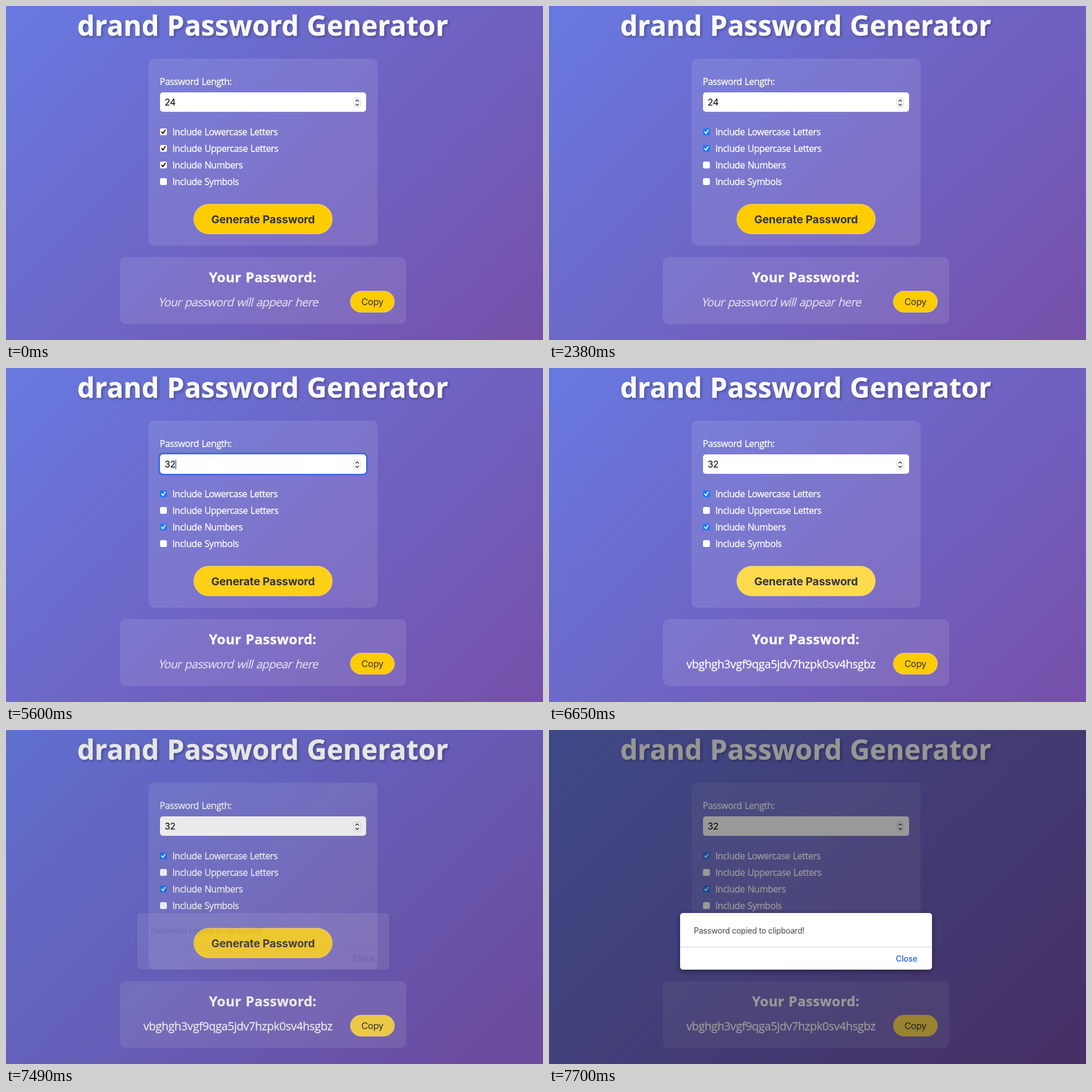
These frames come from a looping animation (938x584 px, 8000 ms). An HTML page:

```html
<!DOCTYPE html>
<html lang="en">
<head>
<meta charset="utf-8">
<title>Password generator</title>
<style>
  html, body { margin: 0; width: 100%; height: 100%; overflow: hidden; }
  svg { display: block; width: 100vw; height: 100vh; background: linear-gradient(135deg, #6779e0, #7550a9); }
  text { white-space: pre; }
  .page { font-family: "Open Sans", "Noto Sans", sans-serif; fill: #fff; stroke: #fff; stroke-width: .3px; }
  .body { font-size: 16px; letter-spacing: -.028em; word-spacing: .07em; }
  .title { font-size: 48px; font-weight: 700; letter-spacing: .2px; word-spacing: 1px; stroke-width: .5px; text-shadow: 2px 2px 4px rgba(0, 0, 0, .3); }
  .heading { font-size: 24px; font-weight: 700; letter-spacing: .3px; word-spacing: 1px; }
  .result { font-size: 20px; letter-spacing: -.023em; }
  .hint { font-size: 20px; letter-spacing: -.033em; word-spacing: .07em; opacity: .74; }
  .ui { font-family: Inter, Roboto, sans-serif; font-size: 16px; letter-spacing: -.3px; fill: #333; }
  .generate { font-size: 19.2px; font-weight: 700; letter-spacing: -.1px; }
  .message { font-size: 14px; letter-spacing: -.25px; fill: #45454f; }
  .close { font-size: 14px; font-weight: 500; letter-spacing: -.1px; fill: #2059dc; }
  .mid { text-anchor: middle; }
  .card { fill: #fff; fill-opacity: .1; }
  .line { fill: none; stroke-linecap: round; stroke-linejoin: round; }
  .button { stroke: #ebd796; stroke-opacity: .8; }
  .box { filter: drop-shadow(0 .5px .5px rgba(0, 0, 0, .25)); }
  #dialog .panel { filter: drop-shadow(0 3px 5px rgba(0, 0, 0, .4)); }
</style>
</head>
<body>
<svg viewBox="0 0 938 584" preserveAspectRatio="none">
  <text class="page title mid" x="448.5" y="52">drand Password Generator</text>

  <rect class="card" x="249" y="92" width="400" height="327" rx="10"/>
  <text class="page body" x="268.5" y="137.5">Password Length:</text>
  <rect x="269" y="151" width="360" height="34" rx="5" fill="#fff"/>
  <rect id="ring" class="line" x="267.5" y="149.5" width="363" height="37" rx="6.5" stroke="#416bde" stroke-width="3"/>
  <text id="length" class="ui" x="277" y="174" style="fill:#000"></text>
  <rect id="caret" y="160" width="1.5" height="17" fill="#2f6bea"/>
  <rect x="607.5" y="160.5" width="12" height="16" rx="4" fill="#fff" stroke="#d9d9d9"/>
  <path class="line" d="M611 166.5l2.5-2.5 2.5 2.5M611 171.5l2.5 2.5 2.5-2.5" stroke="#333" stroke-width="1.4"/>
  <g id="options"></g>
  <rect id="generate" class="button" x="328" y="346.5" width="242" height="52" rx="26"/>
  <text class="ui generate mid" x="449" y="380">Generate Password</text>

  <rect class="card" x="199" y="439" width="500" height="117" rx="10"/>
  <text class="page heading mid" x="448.5" y="482.5">Your Password:</text>
  <text id="hint" class="page hint mid" transform="translate(405 525) skewX(-14)">Your password will appear here</text>
  <text id="result" class="page result mid" x="405" y="525"></text>
  <rect id="copy" class="button" x="601.5" y="498.5" width="77" height="37" rx="18.5"/>
  <text class="ui mid" x="640" y="523">Copy</text>

  <rect id="shade" width="938" height="584"/>
  <g id="dialog">
    <rect class="panel" x="229" y="320" width="440" height="99" rx="5" fill="#fff"/>
    <path d="M229 379.5H669" stroke="#d3d3da"/>
    <text class="ui message" x="253" y="356">Password copied to clipboard!</text>
    <text class="ui close mid" x="624.5" y="405">Close</text>
  </g>
</svg>
<script>
const LOOP = 8000, STEP = 70;
const FOCUS = 980;
const $ = id => document.getElementById(id);
const set = (el, attrs) => { for (const k in attrs) el.setAttribute(k, attrs[k]); };
const show = (el, on) => { el.style.display = on ? '' : 'none'; };

// Each list holds [time, value] pairs; the latest one reached applies.
const at = (list, t) => list.reduce((v, [time, next]) => t >= time ? next : v, list[0][1]);
const ramp = (t, start, end) => Math.min(1, Math.max(0, (t - start) / (end - start)));
const easeOut = p => 1 - (1 - p) ** 2;
const gold = h => `rgb(255,${204 + 14 * h},${77 * h})`;

const lengths = [[0, '24'], [4970, '2'], [5040, ''], [5180, '3'], [5250, '32']];
const passwords = [
  [0, ''],
  [5880, 'g7vtsh0zplg3cvia9hgk5bzfvg4sjhgv'],
  [6160, 'k4hgzv0cjs9ghvq5gpb3hva7gjzsfhgv'],
  [6650, 'vbghgh3vgf9qga5jdv7hzpk0sv4hsgbz']
];
const options = [
  { label: 'Lowercase Letters', states: [[0, 'on']] },
  { label: 'Uppercase Letters', states: [[0, 'on'], [2450, 'off']] },
  { label: 'Numbers', states: [[0, 'on'], [1750, 'pressed'], [1820, 'off'], [3010, 'held'], [3220, 'on']] },
  { label: 'Symbols', states: [[0, 'off']] }
];
const boxFill = { on: '#1a7cfb', pressed: '#1467d8', off: '#fff', held: '#e6e6ea' };

$('options').innerHTML = options.map((o, i) => `
  <g transform="translate(269 ${214 + 29 * i})">
    <rect class="box" width="12" height="12" rx="2.5"/>
    <path class="line" d="M3 6.3l2.2 2.5 3.8-5.8" stroke-width="1.8"/>
    <text class="page body" x="21.5" y="11.5">Include ${o.label}</text>
  </g>`).join('');
const rows = [...$('options').children];

function draw(t) {
  const active = t >= FOCUS;
  options.forEach((o, i) => {
    const [box, tick] = rows[i].children;
    const state = at(o.states, t);
    set(box, { fill: active ? boxFill[state] : '#fff' });
    set(tick, { stroke: active ? '#fff' : '#000' });
    show(tick, state === 'on' || state === 'pressed');
  });

  const focused = t >= 3990 && t < 5810;
  const length = at(lengths, t);
  $('length').textContent = length;
  show($('ring'), focused);
  show($('caret'), focused);
  set($('caret'), { x: 277 + 9.4 * length.length });

  const password = at(passwords, t);
  $('result').textContent = password;
  show($('hint'), !password);

  const hover = easeOut(ramp(t, 5550, 5850)) - .6 * easeOut(ramp(t, 6900, 7230));
  set($('generate'), { fill: gold(hover) });
  set($('copy'), { fill: gold(easeOut(ramp(t, 7100, 7400))) });

  const fade = ramp(t, 7440, 7700);
  set($('shade'), { opacity: .4 * fade });
  set($('dialog'), { opacity: fade ** 1.5 });
}

const start = performance.now();
function tick() {
  const t = (performance.now() - start) % LOOP;
  draw(Math.floor(t / STEP) * STEP);
  requestAnimationFrame(tick);
}
tick();
</script>
</body>
</html>
```
